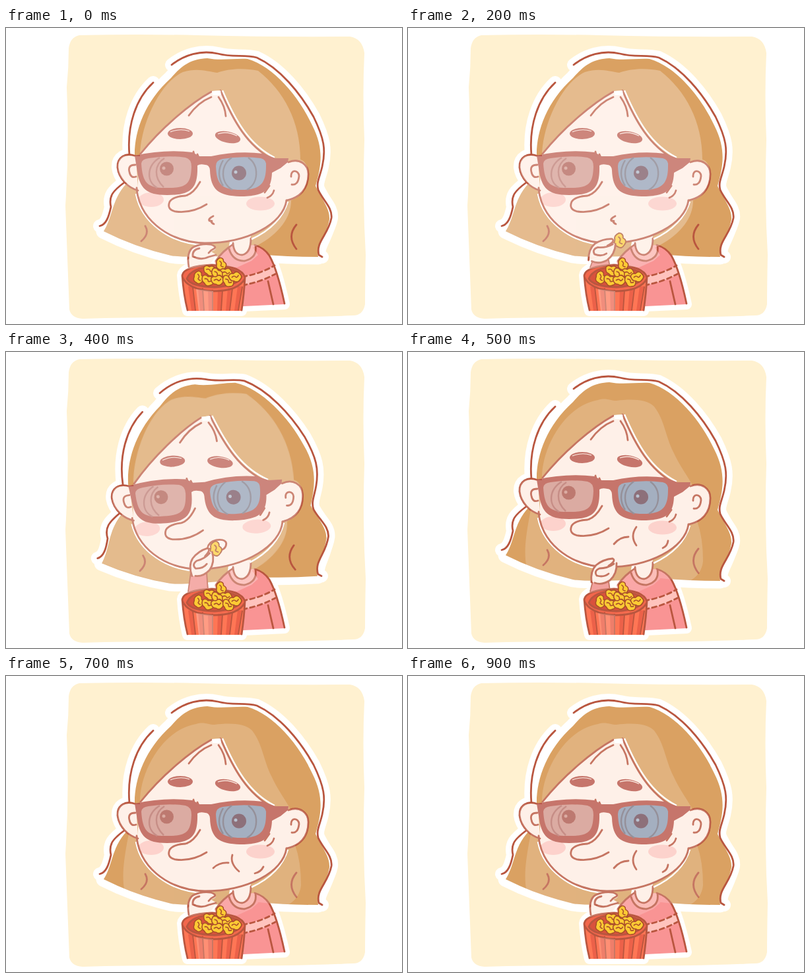
Recreate the animation shown at these times as an HTML page. Size 600 by 450 pixels, loop 1 s.

```html
<!DOCTYPE html>
<html lang="en">
<head>
<meta charset="utf-8">
<title>Popcorn</title>
<style>
html, body { margin: 0; width: 100%; height: 100%; overflow: hidden; background: #fff; }
svg { display: block; width: 600px; height: 450px; }
.ln { fill: none; stroke: #b9563f; stroke-width: 2.8; stroke-linecap: round; stroke-linejoin: round; }
.skin { fill: #feede3; }
.ink { fill: #b9574a; }
.hair { fill: #daa162; }
.w { fill: #fff; stroke: #fff; stroke-linejoin: round; stroke-linecap: round; }
.corn { fill: #fccb34; stroke: #a9502b; stroke-width: 1.6; stroke-linejoin: round; }
</style>
</head>
<body>
<svg viewBox="0 0 600 450">
<defs>
  <path id="hair" d="M195 195C194 158 210 112 250 76C267 56 281 47 305 46C325 50 345 46 366 47C405 58 444 104 464 148C483 185 477 212 469 240C478 260 491 274 490 291C485 318 470 330 473 348Q425 348 384 344L340 320L335 347Q265 349 250 346Q195 333 148 309C162 287 160 260 183 236Z"/>
  <path id="curls" d="M251 56C270 41 295 33 321 39C343 45 362 40 380 45C415 61 446 99 466 135C482 168 485 185 479 211C475 228 470 234 473 246C480 262 495 273 493 289C488 315 469 325 474 345L479 348M223 83C197 107 183 148 187 193M179 235C163 247 155 255 159 272C156 286 152 299 142 301"/>
  <path id="earL" d="M197 195C181 188 168 197 169 212C171 229 185 243 200 247"/>
  <path id="earR" d="M428 204C445 197 458 208 458 222C458 245 445 258 425 262"/>
  <path id="shirt" d="M316 355Q328 338 344 329L376 330Q391 334 399 346Q410 365 422 420L340 424Z"/>
  <path id="tub" d="M267 376Q269 361 312 359Q358 361 362 379Q361 400 357 430H275Q269 405 267 376Z"/>
  <g id="corn">
    <path class="corn" d="M-9-4Q-6-9-1-6Q5-10 8-4Q12 2 7 5Q2 10-3 5Q-9 4-9-4Z"/>
    <path class="corn" style="fill:none" d="M-5-1Q0-4 2 1M2 1Q5 0 6-2"/>
  </g>
  <g id="grab">
    <path class="skin" d="M278 349Q276 333 285 324Q296 315 310 314Q316 316 311 320L316 321Q317 337 306 347Q294 356 282 351Z"/>
    <path class="ln" d="M278 350Q276 333 285 324Q296 315 310 314Q316 317 304 325M316 321Q317 337 306 347Q294 355 283 351M286 340Q281 333 290 329Q302 329 312 322M286 340Q297 343 304 337"/>
  </g>
  <g id="dip">
    <path class="skin" d="M276 364Q273 340 284 333Q297 327 310 329Q320 332 317 337L311 340L319 345L306 364Z"/>
    <path class="ln" d="M277 363Q273 340 284 333Q297 327 310 329Q319 332 316 335Q311 337 307 342M283 347Q282 337 293 335M283 347Q295 354 307 348L318 345"/>
  </g>
</defs>

<path fill="#fff1d0" d="M111 11Q200 9 290 11Q410 14 521 13Q540 16 543 38Q540 100 543 170Q540 260 545 345Q544 390 544 420Q541 437 526 437Q430 441 340 440Q220 439 116 442Q99 441 96 428Q93 350 90 270Q96 180 92 90Q95 60 95 31Q97 14 111 11Z"/>

<g class="tilt">
  <g class="w" stroke-width="18">
    <use href="#hair" stroke-width="23"/><use href="#earL"/><use href="#earR"/>
    <use href="#curls" fill="none" stroke-width="20"/>
  </g>
</g>
<g class="w" stroke-width="16"><use href="#shirt"/><use href="#tub"/></g>
<g class="tilt">
  <use href="#hair" class="hair"/>
  <use href="#curls" class="ln"/>
  <path class="ln" d="M211 301Q218 313 205 324M440 299Q425 317 440 336"/>
</g>

<g id="body">
  <use href="#shirt" fill="#f99494"/>
  <path fill="#ffc3bd" d="M358 378Q385 373 407 361L410 374Q384 388 358 391Z"/>
  <path class="ln" stroke-dasharray="7 5" d="M358 378Q385 374 407 361M358 391Q384 387 408 374"/>
  <path class="ln" d="M318 354Q328 339 344 329M377 330Q391 334 399 346Q411 367 422 419M397 385L405 420"/>
  <path class="skin" d="M343 318L343 333Q349 346 361 344Q371 341 371 316Z"/>
  <path fill="#fbb0a9" d="M340 333Q341 355 362 354Q381 349 378 331L371 330Q371 345 357 345Q346 344 344 331Z"/>
  <path class="ln" d="M338 336Q344 355 362 354Q381 349 378 331M344 327Q345 345 358 345Q371 342 371 320"/>
</g>

<g class="tilt">
  <use href="#earL" class="skin"/><use href="#earR" class="skin"/>
  <path class="skin" d="M312 96C280 114 235 152 203 192L199 245C200 282 235 325 300 327C360 328 420 300 427 258L430 205L404 199C366 179 345 143 325 95Z"/>
  <ellipse cx="220" cy="261" rx="19" ry="11" fill="#fcc8c1"/>
  <ellipse cx="385.500" cy="267" rx="21.500" ry="10.500" fill="#fcc8c1"/>
  <path fill="none" stroke="#fff" stroke-width="2.500" d="M328 95C348 142 369 178 407 197M197 252C204 292 245 328 301 330M427 264C419 290 398 309 372 321"/>
  <path class="ln" d="M311 97C280 114 235 152 204 191M325 95C345 143 366 179 403 199M198 243C200 285 240 325 301 327C366 327 420 298 425 262"/>
  <use href="#earL" class="ln"/><use href="#earR" class="ln"/>
  <path class="ln" d="M196 208Q184 208 187 219Q189 229 197 226M432 226C431 214 444 216 444 225C443 235 439 239 433 238"/>
  <path fill="#fff" d="M312 96L325 95L326 102L313 102Z"/>
  <path class="ln" d="M311 105Q291 113 277 133M322 105Q332 119 333 134"/>
  <ellipse class="ink" cx="264" cy="160.500" rx="19" ry="8.500"/>
  <ellipse class="ink" cx="336" cy="166" rx="19.500" ry="8.500" transform="rotate(12 336 166)"/>
  <path fill="none" stroke="#feede3" stroke-width="1.100" d="M249 158Q264 152 278 157M321 161Q335 156 350 164"/>
  <path class="ln" d="M294 234Q284 252 272 255Q253 256 248 264Q243 276 257 279Q282 282 304 268M392 250L399 240M396 258Q404 255 406 247M285 192L284 188M292 197L290 192"/>

  <path class="ink" d="M195 194Q240 184 283 189L293 195H311Q351 186 390 191L408 198H428L427 204L416 213L403 220C402 248 390 256 354 256C322 255 310 246 309 216Q308 208 302 208Q294 206 290 209C291 244 281 254 244 254C212 254 203 243 199 219Z"/>
  <path fill="#d3988d" d="M205 206Q206 199 216 198Q246 193 272 197Q281 199 281 211C280 236 275 243 246 243C215 244 207 237 205 206Z"/>
  <path fill="#909db2" d="M318 210Q318 201 328 199Q358 194 386 198Q395 200 394 210C394 236 386 246 356 246C327 246 319 238 318 210Z"/>
  <g fill="none" stroke="#b9746b" stroke-width="2.400">
    <path d="M233 197C212 210 213 234 229 243M240 198C224 208 224 228 239 242"/>
    <path stroke="#7d7783" d="M342 197C324 209 325 236 343 246M367 197C384 209 383 236 365 246M329 201Q317 221 329 240"/>
  </g>
  <circle cx="243.500" cy="214" r="10.500" fill="#ae5c50"/>
  <circle cx="353" cy="220.500" r="11" fill="#74505d"/>
  <circle cx="239" cy="213" r="2.500" fill="#d3988d"/>
  <circle cx="348" cy="219" r="2.500" fill="#aab4c5"/>
  <path id="gape" class="ln" style="fill:#fff3ee" d="M309 296Q311 286 323 284Q337 283 338 290Q337 300 325 300Z"/>
  <path id="mouth" class="ln"/>
</g>

<path id="sleeve" fill="#f08d87"/>
<path id="cuff" class="ln" style="stroke-width:1.800"/>
<use id="bite" href="#corn"/>
<use id="hand"/>

<g id="bucket">
  <use href="#tub" fill="#ff7655"/>
  <ellipse cx="314.500" cy="378.500" rx="47" ry="19" fill="#f2674c"/>
  <ellipse cx="316" cy="379" rx="41" ry="15" fill="#d9523d"/>
  <g id="stripes" fill="#ec6149"></g>
  <path class="ln" d="M275 429Q269 405 267 376Q270 362 312 360Q357 362 362 379Q361 402 357 429M267 378Q275 398 314 400Q352 400 362 381M274 381Q282 363 315 364Q351 365 357 378Q351 392 316 394Q280 393 274 381"/>
</g>

<g id="light" fill="#fff">
  <g class="tilt"><path id="glow"/></g>
  <path d="M275 352L340 334L371 330L382 345L372 354L350 364L312 359L268 368ZM288 397L314 400V430H292Z"/>
</g>
<g id="pile"></g>
</svg>

<script>
const $ = id => document.getElementById(id);

const kernels = [[325, 359, 60], [308, 369, 10], [291, 379, 70], [305, 384, 20],
  [333, 373, 0], [319, 374, 35], [320, 384, -10], [336, 385, 30], [347, 379, -15]];
$('pile').innerHTML = kernels.map(([x, y, a]) =>
  `<use href="#corn" transform="translate(${x} ${y}) rotate(${a})"/>`).join('');

let bands = '';
for (let i = 0; i < 6; i++) {
  const x = 276 + i * 15, b = 281 + i * 13, y = 399 - Math.abs(i - 2.5) * 2.5;
  bands += `<path d="M${x} ${y}H${x + 7}L${b + 6} 430H${b}Z"/>` +
    `<path class="ln" style="stroke-width:1.800" d="M${x + 7} ${y + 1}L${b + 6} 429"/>`;
}
$('stripes').innerHTML = bands;

const mouths = {
  pout: 'M314 286Q306 290 308 293Q315 294 310 293Q312 297 315 298',
  chewA: 'M312 292Q321 281 334 281M346 266Q336 280 346 294M386 298Q393 295 394 287',
  chewB: 'M314 292Q323 283 337 284M343 272Q339 285 353 297M377 300Q386 298 390 290',
  open: ''
};
const glows = {
  wide: 'M203 195C203 152 230 85 268 67C290 60 305 66 320 68C335 62 360 60 382 65C421 96 446 142 446 200C455 202 460 216 457 230C452 251 443 258 432 262C432 288 414 313 380 331L345 347Q265 349 250 346Q195 333 148 309C162 287 160 260 183 236C168 228 163 200 179 194Z',
  soft: 'M203 195C201 150 235 82 288 73C300 69 306 74 316 74C340 71 362 72 373 83C389 104 390 128 402 152C412 174 425 190 431 203C445 198 458 207 458 222C458 242 449 253 438 257Q447 282 447 318Q445 338 427 348Q405 347 384 344L335 347Q265 349 250 346Q215 340 179 323C175 300 180 270 186 240C168 230 161 200 179 194Z'
};

// tilt, mouth, glow, hand shape, hand dx, dy, turn, popcorn [x, y]
const steps = [
  [0, 'pout', 'wide', 'dip', 0, 0, 0],
  [0, 'pout', 'wide', 'grab', -2, 9, 6, [317, 333]],
  [0, 'pout', 'wide', 'grab', -3, 5, 6, [320, 323]],
  [-1.7, 'open', 'wide', 'grab', -2, -3, -3, [319, 311]],
  [-3.4, 'open', 'wide', 'grab', 0, -13, -13, [317, 299]],
  [0, 'chewA', 'soft', 'grab', 0, 0, 0],
  [0, 'chewA', 'soft', 'dip', 0, 0, 0],
  [0, 'chewB', 'soft', 'dip', 0, 0, 0],
  [0, 'chewB', 'soft', 'dip', 0, 0, 0],
  [0, 'chewA', 'soft', 'dip', 0, 0, 0]
];
const heads = document.querySelectorAll('.tilt');
let last = -1;

function pose(n) {
  const [tilt, mouth, glow, hand, dx, dy, turn, corn] = steps[n];
  for (const h of heads) h.setAttribute('transform', `rotate(${tilt} 352 362)`);
  $('mouth').setAttribute('d', mouths[mouth]);
  $('gape').style.display = mouth === 'open' ? '' : 'none';
  $('glow').setAttribute('d', glows[glow]);
  $('hand').setAttribute('href', '#' + hand);
  $('hand').setAttribute('transform', `translate(${dx} ${dy}) rotate(${turn} 296 335)`);
  const y = 348 + dy, arm = hand === 'grab';
  $('sleeve').setAttribute('d', arm ? `M280 ${y}L276 368H308L304 ${y}Z` : '');
  $('cuff').setAttribute('d', arm ? `M280 ${y}L276 364M304 ${y}L306 364` : '');
  $('bite').style.display = corn ? '' : 'none';
  if (corn) $('bite').setAttribute('transform', `translate(${corn[0]} ${corn[1]}) rotate(65) scale(1.15)`);
  $('light').setAttribute('opacity', n % 2 ? 0.18 : 0.28);
}

function tick() {
  const n = Math.floor(performance.now() % 1000 / 100);
  if (n !== last) pose(last = n);
  requestAnimationFrame(tick);
}
tick();
</script>
</body>
</html>
```
